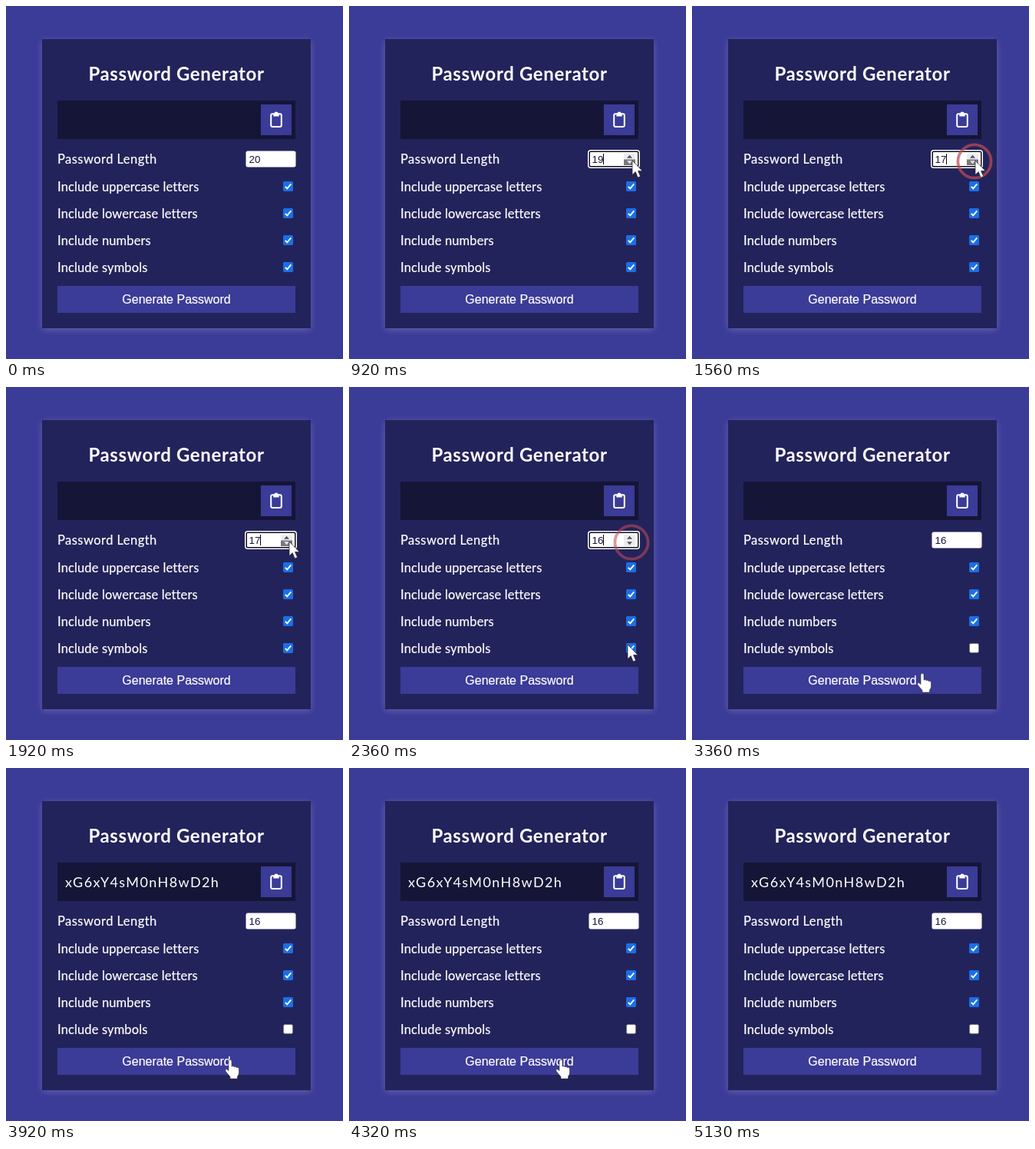
An HTML page that plays this animation: 439 px wide and 459 px high, repeating every 5.37 s.

```html
<!DOCTYPE html>
<html lang="en">
<head>
<meta charset="utf-8">
<title>Password Generator</title>
<style>
  html, body { margin: 0; width: 100%; height: 100%; overflow: hidden; background: #3b3b98; }
  svg { display: block; width: 439px; height: 459px; }
  text { fill: #fff; font: 16.5px Lato, "Open Sans", sans-serif; letter-spacing: .13px; }
  .label { stroke: #fff; stroke-width: .2; }
  .length { letter-spacing: .45px; }
  .title { font-weight: 700; font-size: 24px; letter-spacing: .65px; text-anchor: middle; }
  .password { font-size: 18px; letter-spacing: 1.4px; }
  .button { font: 16px "Liberation Sans", sans-serif; letter-spacing: 0; text-anchor: middle; }
  .value { font: 13.33px "Liberation Sans", sans-serif; letter-spacing: 0; fill: #15153a; }
  .card { filter: drop-shadow(0 2px 5px rgba(255, 255, 255, .2)); }
</style>
</head>
<body>
<svg viewBox="0 0 439 459">
  <rect width="439" height="459" fill="#3b3b98"/>
  <rect class="card" x="47" y="43" width="350" height="376" fill="#23235b"/>
  <text class="title" x="222" y="97">Password Generator</text>

  <rect x="67" y="123" width="310" height="50" fill="#151537"/>
  <text class="password" id="password" x="77" y="155">xG6xY4sM0nH8wD2h</text>
  <rect x="332" y="128" width="40" height="40" fill="#3b3b98"/>
  <rect x="345.2" y="140.2" width="13.6" height="16.8" rx="2" fill="none" stroke="#fff" stroke-width="2"/>
  <circle cx="352" cy="140" r="2.6" fill="#fff"/>
  <rect x="348.3" y="140" width="7.4" height="3.6" rx=".6" fill="#fff"/>

  <text class="label length" x="67" y="205">Password Length</text>
  <g id="focus">
    <rect x="311" y="187" width="68" height="24" rx="4" fill="#fff"/>
    <rect x="312.5" y="188.5" width="65" height="21" rx="2.5" fill="#101018"/>
  </g>
  <rect id="field" x="314" y="190" width="62" height="18" rx="1" fill="#fff" stroke="#fff"/>
  <text class="value" id="value" x="316.5" y="203.5"></text>
  <path id="caret" d="M331.5 192v14" stroke="#000"/>
  <g id="spinner">
    <rect x="358" y="191.5" width="15" height="15.5" fill="#ececee"/>
    <rect id="down" x="358" y="199.5" width="15" height="7.5" fill="#77777d"/>
    <path d="M362 197.8l3.5-4 3.5 4z" fill="#505068"/>
    <path id="downArrow" d="M362 201.2l3.5 4 3.5-4z"/>
  </g>

  <g id="options"></g>

  <rect x="67" y="364" width="310" height="35" fill="#3b3b98"/>
  <text class="button label" x="222" y="386.5">Generate Password</text>

  <circle id="ring" r="21.6" fill="none" stroke="#c04a58" stroke-width="3.8"/>
  <path id="arrow" fill="#fff" stroke="#222" stroke-width=".7"
    d="M0 0V18.5L4.2 14.6 7.2 22 10.6 20.6 7.5 13.4H13.2Z"/>
  <path id="hand" fill="#fff" stroke="#333" stroke-width=".6"
    d="M-2 1.5Q-2-.8 0-.8T2 1.5V8Q4.3 7 5.3 8.6 7.3 7.7 8.2 9.4 11.5 8.6 11.5 12V16Q11.5 19 9.5 21V24H0V21.5L-6 14.2Q-7 12-4.5 11.6L-2 13.6Z"/>
</svg>
<script>
const LOOP = 5370, FADE = 240, BOW = .12;
const $ = id => document.getElementById(id);
const show = (id, on) => $(id).setAttribute('visibility', on ? 'visible' : 'hidden');
const set = (id, attrs) => {
  for (const key in attrs) $(id).setAttribute(key, attrs[key]);
};

$('options').innerHTML = ['uppercase letters', 'lowercase letters', 'numbers', 'symbols']
  .map((name, i) => {
    const y = 240 + 35 * i;
    return `<text class="label" x="67" y="${y + .5}">Include ${name}</text>
      <g transform="translate(361 ${y - 12})">
        <rect x=".5" y=".5" width="12" height="12" rx="2" fill="#fff" stroke="#777"/>
        <g id="check${i}"><rect width="13" height="13" rx="2" fill="#1a6fe6"/>
        <path d="M2.8 6.8l2.5 2.6 5-6" fill="none" stroke="#fff" stroke-width="1.9"/></g>
      </g>`;
  }).join('');

// Each move: when it starts and ends, and where the pointer comes to rest
const entry = { x: 226, y: 470 };
const moves = [
  { from: 0, to: 520, x: 369, y: 201 },
  { from: 2240, to: 2360, x: 363, y: 335 },
  { from: 3160, to: 3360, x: 300, y: 373 },
  { from: 3520, to: 3600, x: 292, y: 380 },
  { from: 4080, to: 4320, x: 276, y: 380 },
  { from: 4770, to: 5130, x: 240, y: 470 }
];
const decrements = [680, 1000, 1560, 2200];
const uncheck = 2920, generate = 3600;
const clicks = [...decrements, uncheck, generate];

function pointer(t) {
  const i = moves.findLastIndex(m => t >= m.from);
  const a = moves[i - 1] || entry, b = moves[i];
  const p = Math.min(1, (t - b.from) / (b.to - b.from));
  const e = p * p * (3 - 2 * p);
  const bend = BOW * Math.sin(Math.PI * e);
  const dx = b.x - a.x, dy = b.y - a.y;
  return { x: a.x + dx * e - dy * bend, y: a.y + dy * e + dx * bend };
}

function draw(t) {
  const { x, y } = pointer(t);
  const inside = (l, top, r, b) => x >= l && x <= r && y >= top && y <= b;
  const focused = t >= decrements[0] && t < uncheck;
  const hover = inside(313, 189, 377, 209);
  const onButton = inside(67, 364, 377, 399);

  $('value').textContent = 20 - decrements.filter(d => t >= d).length;
  show('focus', focused);
  show('caret', focused);
  set('field', { 'stroke-width': focused ? 0 : 3 });
  show('spinner', focused || hover);
  show('down', hover);
  set('downArrow', { fill: hover ? '#e4e4ea' : '#505068' });
  show('check3', t < uncheck);
  show('password', t >= generate);

  const click = clicks.find(c => t >= c && t < c + FADE);
  show('ring', click);
  if (click) {
    const spot = pointer(click);
    set('ring', {
      cx: spot.x - 1, cy: spot.y + 1,
      opacity: .72 * (1 - ((t - click) / FADE) ** 4)
    });
  }

  const transform = `translate(${x.toFixed(2)} ${y.toFixed(2)})`;
  set('arrow', { transform });
  set('hand', { transform });
  show('arrow', !onButton);
  show('hand', onButton);
}

const start = performance.now();
function tick() {
  draw((performance.now() - start) % LOOP);
  requestAnimationFrame(tick);
}
draw(0);
requestAnimationFrame(tick);
</script>
</body>
</html>
```
